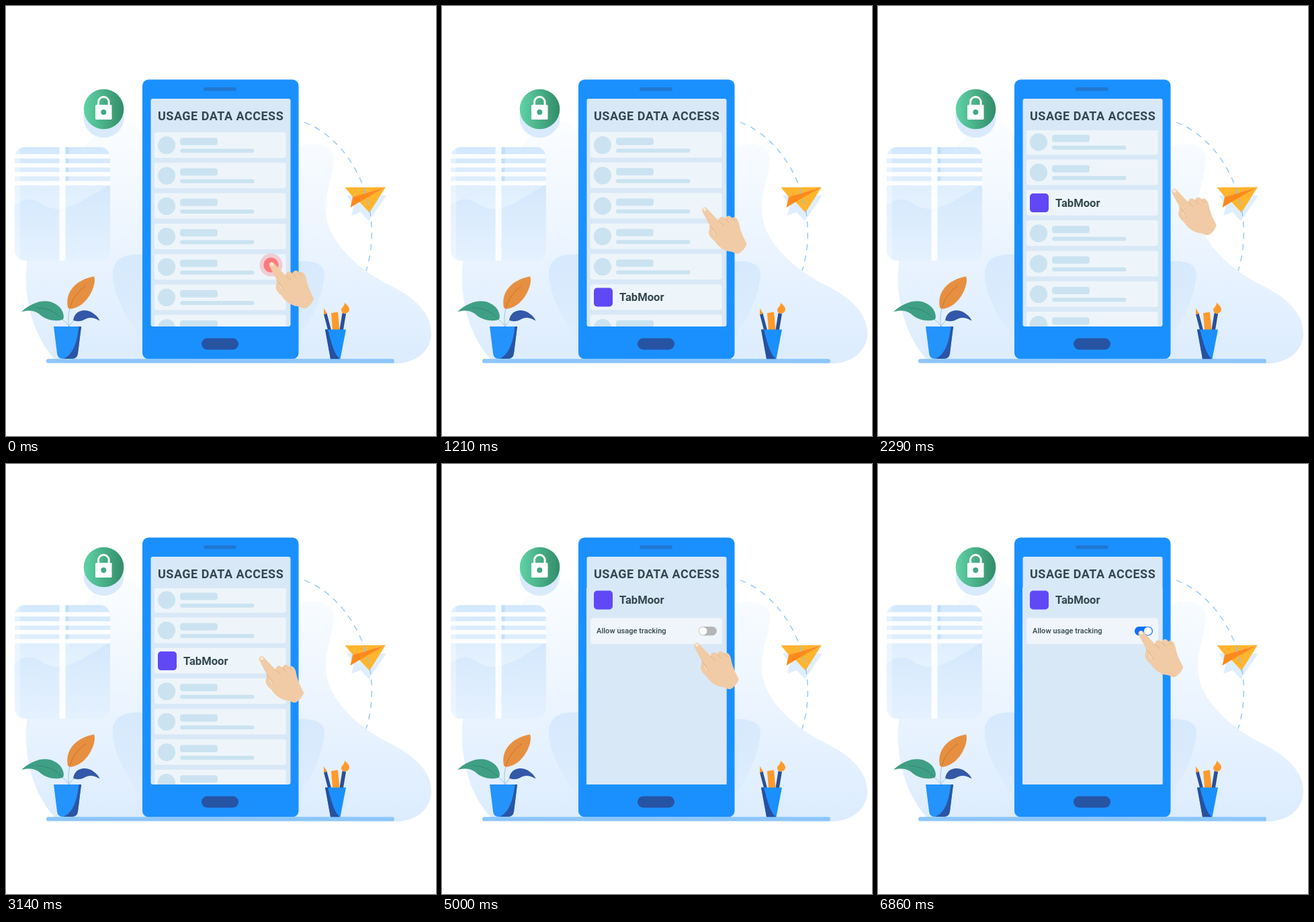
Write an HTML page that moves like this. It is 640x640 px and loops after 8430 ms.

```html
<!DOCTYPE html>
<html lang="en">
<head>
<meta charset="utf-8">
<title>Usage data access</title>
<style>
  html, body { margin: 0; width: 100%; height: 100%; overflow: hidden; background: #fff; }
  svg { display: block; width: 100vw; height: 100vh; }
  text { font-family: Roboto, "Open Sans", sans-serif; fill: #32474f; }
  .title { font-weight: 700; font-size: 18px; letter-spacing: .5px; }
  .app { font-weight: 700; font-size: 16.6px; }
  .label { font-weight: 500; font-size: 11.1px; }
</style>
</head>
<body>
<svg viewBox="0 0 640 640" xmlns="http://www.w3.org/2000/svg">
  <defs>
    <linearGradient id="hill" x1="0" y1="0" x2="0" y2="1">
      <stop offset="0" stop-color="#fbfdff"/><stop offset="1" stop-color="#dcecfe"/>
    </linearGradient>
    <linearGradient id="bush" x1="0" y1="0" x2="0" y2="1">
      <stop offset="0" stop-color="#d7e9fd"/><stop offset="1" stop-color="#deedfe"/>
    </linearGradient>
    <linearGradient id="pane" x1="0" y1="0" x2="0" y2="1">
      <stop offset="0" stop-color="#d3e8fd"/><stop offset=".55" stop-color="#e6f2fe"/><stop offset="1" stop-color="#eaf4ff"/>
    </linearGradient>
    <linearGradient id="view" x1="0" y1="0" x2="0" y2="1">
      <stop offset="0" stop-color="#cfe5fc"/><stop offset="1" stop-color="#e3f0fe"/>
    </linearGradient>
    <linearGradient id="green">
      <stop offset="0" stop-color="#60d3a7"/><stop offset="1" stop-color="#328c69"/>
    </linearGradient>
    <clipPath id="window"><rect x="13" y="210" width="142" height="169" rx="15"/></clipPath>
    <clipPath id="list"><rect x="215.5" y="185" width="208.5" height="292"/></clipPath>
  </defs>

  <!-- scenery -->
  <path fill="url(#hill)" d="M78 531C42 498 28 440 30 396C32 335 72 290 98 242C122 197 146 172 180 172C192 172 200 184 205 200L436 208C464 200 492 208 488 232C484 262 474 282 476 306C478 350 524 392 570 415C606 433 633 455 633 488C633 512 612 530 585 532Z"/>
  <path fill="url(#bush)" d="M204 370C176 368 158 376 159 400C160 432 178 462 204 498ZM435 380C458 378 475 385 474 400C472 432 456 464 435 496Z"/>

  <g clip-path="url(#window)">
    <rect x="13" y="210" width="142" height="169" fill="url(#pane)"/>
    <path fill="url(#view)" opacity=".75" d="M13 296C30 284 42 286 56 296C84 314 120 286 155 265V380H13Z"/>
    <path fill="#fff" opacity=".3" d="M13 210h8v169h-8z"/>
    <path fill="#b4d8fb" opacity=".6" d="M88 210h5.500v57h-5.500z"/>
    <path fill="#fff" opacity=".9" d="M13 220.500h142v6.500H13zM13 234h142v6.500H13zM13 247h142v6.500H13zM13 260.500h142v6.500H13z"/>
    <path fill="#fff" opacity=".85" d="M79.500 210h9v169h-9z"/>
  </g>

  <circle cx="145.500" cy="166" r="30" fill="#d9eafd"/>
  <circle cx="145.500" cy="153.500" r="29.800" fill="url(#green)"/>
  <path fill="none" stroke="#fff" stroke-width="3" d="M137.500 148v-5a7.800 7.800 0 0 1 15.600 0v5"/>
  <rect x="133" y="147" width="24.500" height="22" rx="1.500" fill="#fff"/>
  <circle cx="145.300" cy="158" r="4" fill="#43a983"/>

  <path fill="#dfeefe" d="M507 282L566 282L540 320L528 307L514 312L518 297Z"/>
  <path fill="#ffb52e" d="M504.500 270L565 269.500L516 284ZM565 269.500L525.500 291L541 307.500Z"/>
  <path fill="#ff8a1c" d="M565 269.500L516 284L512.500 300L525.500 292Z"/>
  <path fill="none" stroke="#86c2fb" stroke-width="1.300" stroke-dasharray="9 8" d="M444 173C515 200 565 300 536 394"/>

  <!-- phone -->
  <rect x="203" y="109.500" width="232.500" height="416" rx="9" fill="#1a90ff"/>
  <rect x="294" y="121" width="49" height="5.500" rx="2.700" fill="#2177d3"/>
  <rect x="291" y="494.500" width="55" height="17" rx="8.500" fill="#2753a3"/>
  <rect x="215.500" y="138" width="208" height="339" rx="3" fill="#d9e8f7"/>
  <text class="title" x="226" y="169.500">USAGE DATA ACCESS</text>
  <g clip-path="url(#list)"><g id="rows"></g></g>
  <g id="detail">
    <rect x="215" y="184" width="208.500" height="293" fill="#d9e8f7"/>
    <g id="head"></g>
    <rect x="221" y="229" width="196" height="39" rx="3.500" fill="#eff5fa"/>
    <text class="label" x="230" y="252">Allow usage tracking</text>
    <rect x="382" y="242" width="27" height="13.200" rx="6.600" fill="#b5b5b5"/>
    <rect id="on" x="382" y="242" width="27" height="13.200" rx="6.600" fill="#0f70ff"/>
    <circle id="knob" cy="248.600" r="5.900" fill="#fff"/>
  </g>

  <!-- desk -->
  <rect x="60" y="525.300" width="518" height="6.200" rx="3.100" fill="#8cc6fc"/>
  <g fill="none" stroke="#9fc3e4" stroke-width="1">
    <path d="M94 478C92 468 93 458 95 450M94 477Q90 470 82 465M94 477Q97 471 103 466"/>
  </g>
  <path fill="#e78f40" d="M92 449C87 424 106 407 131 402.500C136 414 121 449 95 451Z"/>
  <path fill="#3f9f84" d="M23 455C40 440 60 434 76 445C86 452 88 465 84 467C70 471 56 465 49 458C41 452 31 453 23 455Z"/>
  <path fill="#3358a8" d="M100 467.500C102 454 115 450 126 455C133 459 138 464 139.500 468.500C130 463 124 463 118 466C112 470 104 470 100 467.500Z"/>
  <g fill="none" stroke-width=".7">
    <path stroke="#b8692b" d="M95 449Q100 430 119 416"/>
    <path stroke="#2e7d69" d="M83 465Q68 449 45 449"/>
  </g>
  <path fill="#2493fc" d="M71 477H112L107 517Q106 525 98 525H84Q77 525 76 517Z"/>
  <path fill="#2a55a5" d="M112 477L107 517Q106 525 98 525H86C100 518 106 500 108.500 477Z"/>

  <path fill="#2a4f98" d="M473 459L477.500 457.500L484 482H479ZM500.500 457L506 458L502 482H496.500Z"/>
  <path fill="#ff9a2b" d="M473 450L478 457.500L473 459.500ZM484 457L494 455.500L496.500 482H486ZM504 441.500C507 445 511 447 511 452C510 459 500 460 499 453C499 448 504 448 504 441.500Z"/>
  <path fill="#1a90ff" d="M475 481.500H506L497.500 525.300H483Z"/>
  <path fill="#27509f" d="M475 481.500L483 525.300H497C488 518 484 500 479 481.500Z"/>

  <!-- touch -->
  <g id="ring">
    <circle r="17" fill="#f07a80" opacity=".33"/>
    <circle r="11" fill="#ff6f75" opacity=".9"/>
  </g>
  <g id="hand">
    <path fill="#f0cba5" d="M1 1C3 -1 6 0 8 3L24 20C25 14 30 12 34 17C37 11 42 12 44 16C49 12 54 18 55 26C57 36 60 42 66 54C66 58 60 66 54 69C50 70 45 66 42 66C32 65 24 59 18 50C13 46 9 41 9.500 36Q11 31 11 27L0 6C-1 3 0 2 1 1Z"/>
    <path fill="#fbe9d8" d="M1 2C3 0 5 1 6 3Q6 6 4 6Q1 5 1 2Z"/>
    <path fill="none" stroke="#d6a57b" stroke-width=".7" d="M11 27L16 33L21.500 43M24 20L32 27M34 17L40 23M44 16L49 21"/>
    <path fill="#fbe9d8" d="M15 33L21 43Q16 39 15 33Z"/>
  </g>
</svg>
<script>
const LOOP = 8430, STEP = 1000 / 14;
const PITCH = 45.3, FIRST = 207, APP_ROW = 7, SCROLL = 231.3, SCROLL_END = 1857;

// each key: time, values, easing power of the way to it
const handKeys = [
  [0, [392, 381]], [786, [379, 333]], [1180, [384, 302]], [1643, [430, 268]],
  [1714, [438, 272]], [2214, [438, 272]], [3143, [377, 286], 2],
  [3290, [359, 290]], [4429, [359, 290]], [5429, [388, 248]]
];
const ringKeys = [
  [0, [1, 1]], [790, [1, 1]], [1000, [0, 1]], [3290, [0, 1]], [3430, [1, 1]],
  [3570, [1, 1]], [3860, [0, 1.5]], [3861, [0, 1]], [5990, [0, 1]],
  [6360, [1, 1]], [6500, [1, 1]], [6850, [0, 1.5]]
];
const detailKeys = [[3560, [0]], [3920, [1]]];
const switchKeys = [[6400, [0]], [6780, [1]]];

const get = id => document.getElementById(id);

function at(keys, t) {
  if (t <= keys[0][0]) return keys[0][1];
  for (let i = 1; i < keys.length; i++) {
    const [end, to, power = 1] = keys[i];
    if (t > end) continue;
    const [start, from] = keys[i - 1];
    const p = ((t - start) / (end - start)) ** power;
    return from.map((v, n) => v + (to[n] - v) * p);
  }
  return keys[keys.length - 1][1];
}

const rect = (x, y, w, h, r, fill) =>
  `<rect x="${x}" y="${y}" width="${w}" height="${h}" rx="${r}" fill="${fill}"/>`;

const app = y => rect(226, y - 14, 28, 28, 5, "#6048f5") +
  `<text class="app" x="264" y="${y + 5.700}">TabMoor</text>`;

function row(i) {
  const y = FIRST + i * PITCH;
  const card = rect(221, y - 19, 195.5, 38, 3, "#eef5fa");
  if (i === APP_ROW) return card + app(y + .3);
  return card + `<circle cx="239" cy="${y + .3}" r="13.2" fill="#cbe3f1"/>` +
    rect(259, y - 10.8, 56, 11, 4, "#cbe3f1") +
    rect(259, y + 5.500, 110.5, 6, 3, "#cbe3f1");
}

get("rows").innerHTML = Array.from({ length: 13 }, (_, i) => row(i)).join("");
get("head").innerHTML = app(202.5);

function draw(now) {
  const t = Math.floor((now % LOOP + 5) / STEP) * STEP % LOOP;
  const scroll = SCROLL * Math.min(1, t / SCROLL_END) ** 2.2;
  get("rows").setAttribute("transform", `translate(0 ${-scroll})`);

  const [x, y] = at(handKeys, t);
  get("hand").setAttribute("transform", `translate(${x} ${y})`);

  const [alpha, size] = at(ringKeys, t);
  get("ring").setAttribute("transform", `translate(${x + 2.5} ${y + 4.5}) scale(${size})`);
  get("ring").setAttribute("opacity", alpha);

  get("detail").setAttribute("opacity", at(detailKeys, t)[0]);
  const [on] = at(switchKeys, t);
  get("on").setAttribute("opacity", on);
  get("knob").setAttribute("cx", 388.6 + 13.2 * on);
}

const begin = performance.now();
function tick() {
  draw(performance.now() - begin);
  requestAnimationFrame(tick);
}
tick();
</script>
</body>
</html>
```
